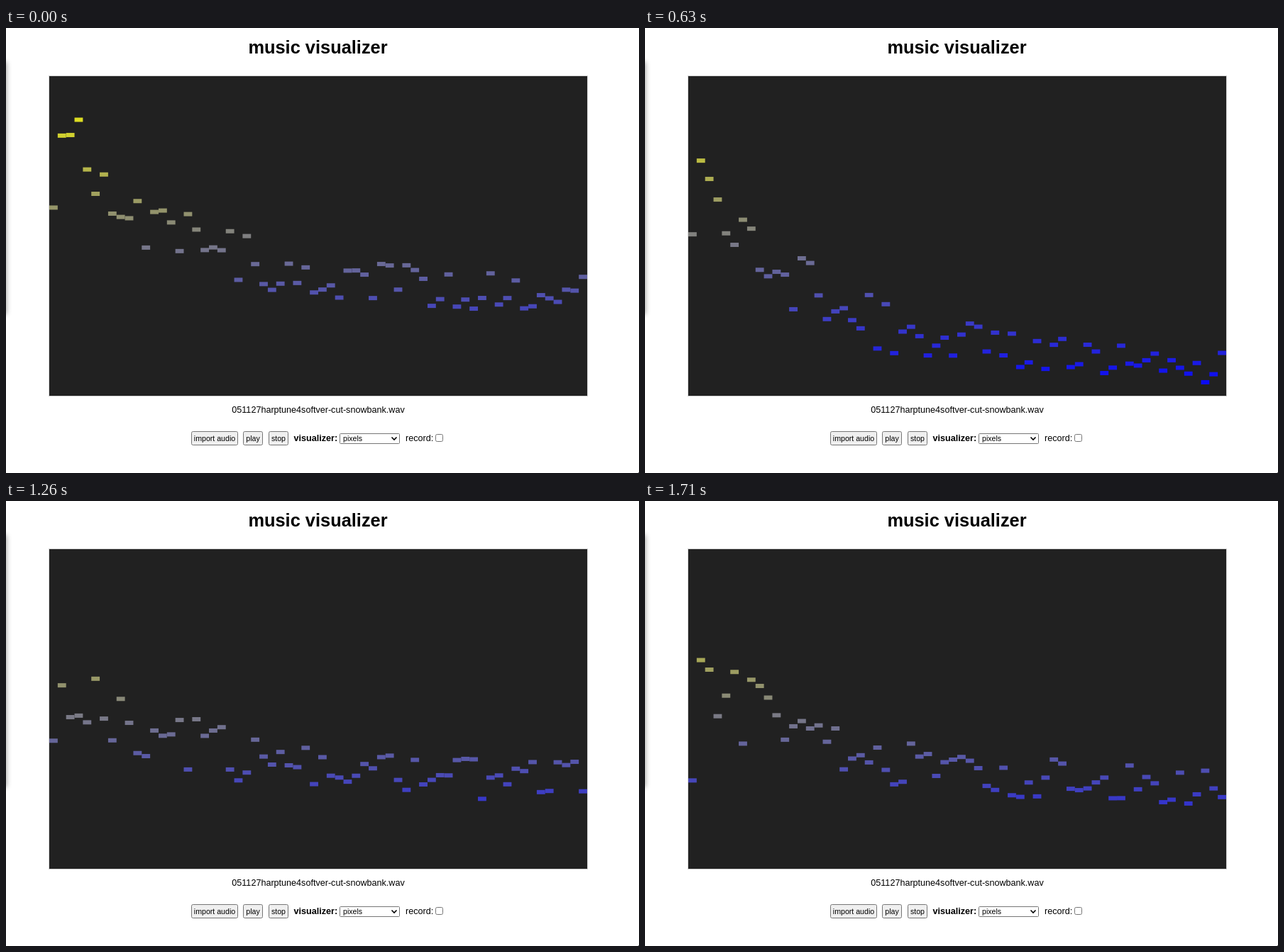
These frames come from a looping animation (892 by 628 pixels, 1.8 s). An HTML page:

```html
<!DOCTYPE html>
<html lang="en">
<head>
<meta charset="utf-8">
<title>music visualizer</title>
<style>
  html, body { margin: 0; width: 100%; height: 100%; overflow: hidden; background: #fff; }
  svg { display: block; font: 12.6px "Liberation Sans", Arial, sans-serif; }
  .small { font-size: 10.6px; }
  .bold { font-weight: bold; }
  .box { fill: #fff; stroke: #767676; }
  .button { fill: #efefef; stroke: #767676; }
</style>
</head>
<body>
<svg width="892" height="628" viewBox="0 0 892 628">
  <defs>
    <filter id="blur" x="-20" y="20" width="50" height="420" filterUnits="userSpaceOnUse">
      <feGaussianBlur stdDeviation="3.5"/>
    </filter>
  </defs>
  <rect x="-12" y="48" width="13" height="356" fill="#000" opacity=".35" filter="url(#blur)"/>
  <text class="bold" x="439.5" y="35.5" text-anchor="middle" font-size="25.4">music visualizer</text>
  <rect x="60.5" y="67.5" width="759" height="452" fill="#212121" stroke="#d3d3d3"/>
  <g id="bars"></g>
  <text x="440" y="543" text-anchor="middle">051127harptune4softver-cut-snowbank.wav</text>

  <rect class="button" x="261.5" y="569.5" width="65" height="19" rx="2"/>
  <rect class="button" x="334.5" y="569.5" width="27" height="19" rx="2"/>
  <rect class="button" x="370.5" y="569.5" width="27" height="19" rx="2"/>
  <g class="small" text-anchor="middle">
    <text x="294" y="583">import audio</text>
    <text x="348" y="583">play</text>
    <text x="384" y="583">stop</text>
  </g>
  <text class="bold" x="405.5" y="583">visualizer:</text>
  <rect class="box" x="470.5" y="572.5" width="84" height="14" rx="1"/>
  <text class="small" x="475" y="583">pixels</text>
  <path d="M543.5 577.5l3.5 3.5 3.5-3.5" fill="none" stroke="#000" stroke-width="1.6"/>
  <text x="563" y="583">record:</text>
  <rect class="box" x="605.5" y="573.5" width="10" height="10" rx="2"/>
  <rect x="891" y="627" width="1" height="1" fill="#555"/>
</svg>
<script>
const LOOP = 1800, STEP = 90, BARS = 64;
const LEFT = 61, TOP = 68, WIDTH = 758, HEIGHT = 451, BAR_HEIGHT = 6;
const DECAY = 14;

// Where the spectrum starts (bass) and settles (treble), as heights on stage.
const poses = [
  { step: 0, bass: 150, treble: 374 },
  { step: 3, bass: 190, treble: 352 },
  { step: 7, bass: 205, treble: 475 },
  { step: 9, bass: 190, treble: 395 },
  { step: 12, bass: 235, treble: 424 },
  { step: 15, bass: 215, treble: 384 },
  { step: 19, bass: 235, treble: 402 }
];

const mix = (a, b, t) => a + (b - a) * t;
const clamp = (v, low, high) => Math.min(high, Math.max(low, v));

// Repeatable noise from -1 to 1.
function noise(bar, seed) {
  const n = Math.sin(bar * 127.1 + seed * 311.7 + 17.3) * 43758.5453;
  return 2 * (n - Math.floor(n)) - 1;
}

function poseAt(step) {
  const next = Math.max(1, poses.findIndex(pose => pose.step >= step));
  const a = poses[next - 1], b = poses[next];
  const t = (step - a.step) / (b.step - a.step);
  return { bass: mix(a.bass, b.bass, t), treble: mix(a.treble, b.treble, t) };
}

// Loud, scattered bass falls off to a quieter, tighter treble.
function barCenter(bar, step, { bass, treble }) {
  const falloff = Math.exp(-bar / DECAY);
  const scatter = (28 + 48 * falloff) * noise(bar, step);
  const firstBarDrop = bar === 0 ? 130 : 0;
  return clamp(mix(treble, bass, falloff) + scatter + firstBarDrop, TOP + 4, TOP + HEIGHT - 4);
}

const group = document.getElementById("bars");
const bars = Array.from({ length: BARS }, (_, bar) => {
  const rect = document.createElementNS("http://www.w3.org/2000/svg", "rect");
  rect.setAttribute("x", LEFT + bar * WIDTH / BARS);
  rect.setAttribute("width", WIDTH / BARS);
  rect.setAttribute("height", BAR_HEIGHT);
  return group.appendChild(rect);
});

function draw(step) {
  const pose = poseAt(step);
  bars.forEach((rect, bar) => {
    const center = barCenter(bar, step, pose);
    const level = Math.round((TOP + HEIGHT - center) / HEIGHT * 255);
    rect.setAttribute("y", center - BAR_HEIGHT / 2);
    rect.setAttribute("fill", `rgb(${level},${level},${255 - level})`);
  });
}

const start = performance.now();
function tick() {
  draw(Math.floor((performance.now() - start) % LOOP / STEP));
  requestAnimationFrame(tick);
}
tick();
</script>
</body>
</html>
```
